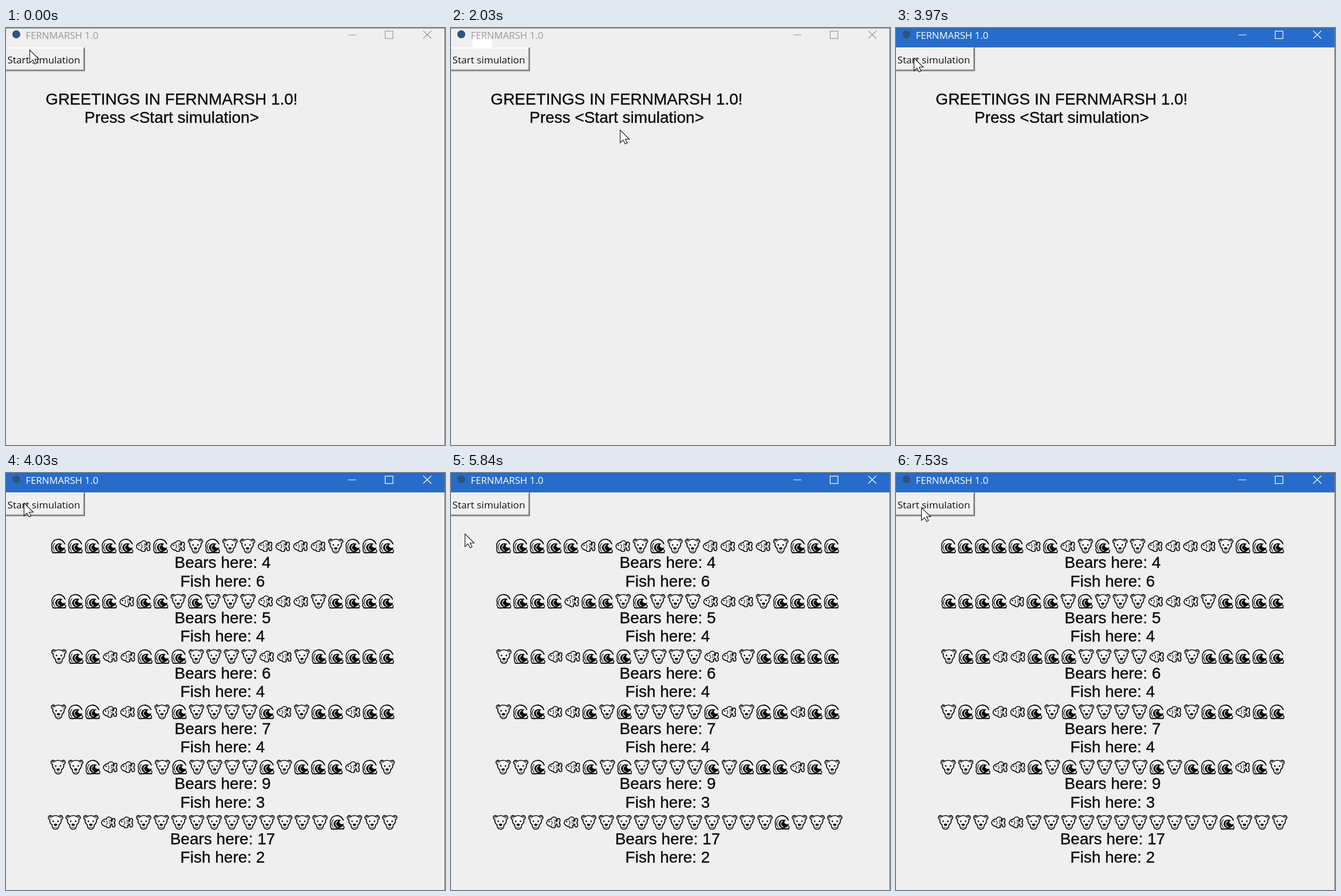
Write an HTML page with a canvas that moves like this. It is 767 px wide and 730 px high and loops after 8 s.

```html
<!DOCTYPE html>
<html lang="en">
<head>
<meta charset="utf-8">
<title>FERNMARSH 1.0</title>
<style>
html, body { margin: 0; width: 767px; height: 730px; overflow: hidden; background: #efefef; }
canvas { display: block; }
</style>
</head>
<body>
<canvas id="stage" width="767" height="730"></canvas>
<script>
const ctx = document.getElementById('stage').getContext('2d');
const LOOP = 8000, STEP = 60;
const PATCH = 430, ACTIVE = 3810, PRESS = 3870, RELEASE = 3950, RESULT = 4030;
const BG = '#efefef', INK = '#0a0a0a', PALE = '#f7f7f7';
const UI = '"Open Sans", "Noto Sans", sans-serif';
const BODY = '28px "Liberation Sans", Arial, sans-serif';
const LINE = 32.25, FIRST = 134;

// W water, F fish, B bear
const rivers = [
  'WWWWWFWFBWBBFFFFBWWW',
  'WWWWFWWBWBBBFFFBWWWW',
  'BWWFFWWWBBBBFFBWWWWW',
  'BWWFFWBWBBBBWFBWWFWW',
  'BBWFFWBWBBBBWBWWWFWB',
  'BBBFFBBBBBBBBBBBWBBB'
];

// Each pointer move is one quadratic curve that begins where the last one ended
const home = [41, 38];
const moves = [
  { from: 90, to: 710, bend: [67, -23], end: [45, 57] },
  { from: 1210, to: 1970, bend: [366, 105], end: [306, 203] },
  { from: 2030, to: 2660, bend: [247, 47], end: [31, 41] },
  { from: 2900, to: 3140, bend: [31, 46], end: [31, 52] },
  { from: 4580, to: 4660, bend: [31, 50], end: [31, 54] },
  { from: 5570, to: 6070, bend: [21, 94], end: [24, 158] },
  { from: 6510, to: 6990, bend: [24, 100], end: [44, 50] },
  { from: 7350, to: 7530, bend: [44, 55], end: [44, 60] }
];

function pointerAt(t) {
  let pos = home;
  for (const { from, to, bend, end } of moves) {
    if (t < from) break;
    const gaps = Math.round((to - from) / STEP);
    const done = Math.floor((t - from) / (to - from) * gaps + 1e-6) + 1;
    const u = Math.min(1, done / (gaps + 1)), v = 1 - u;
    pos = pos.map((p, i) => Math.round(v * v * p + 2 * u * v * bend[i] + u * u * end[i]));
  }
  return pos;
}

function rect(color, x, y, w, h) {
  ctx.fillStyle = color;
  ctx.fillRect(x, y, w, h);
}

function text(str, x, y, font, color) {
  ctx.font = font;
  ctx.fillStyle = color;
  ctx.fillText(str, x, y);
}

// Body copy is centred and a little heavier than the plain face
function bodyLine(str, x, row) {
  const y = FIRST + row * LINE;
  ctx.textAlign = 'center';
  text(str, x, y, BODY, INK);
  ctx.strokeStyle = INK;
  ctx.lineWidth = .35;
  ctx.strokeText(str, x, y);
  ctx.textAlign = 'left';
}

function oval(color, x, y, rx, ry = rx) {
  ctx.fillStyle = color;
  ctx.beginPath();
  ctx.ellipse(x, y, rx, ry, 0, 0, Math.PI * 2);
  ctx.fill();
}

function arc(color, width, x, y, r, a, b) {
  ctx.strokeStyle = color;
  ctx.lineWidth = width;
  ctx.beginPath();
  ctx.arc(x, y, r, a * Math.PI, b * Math.PI);
  ctx.stroke();
}

function lines(color, width, ...runs) {
  ctx.strokeStyle = color;
  ctx.lineWidth = width;
  ctx.beginPath();
  for (const [x1, y1, x2, y2] of runs) {
    ctx.moveTo(x1, y1);
    ctx.lineTo(x2, y2);
  }
  ctx.stroke();
}

// Ovals merged into one outlined silhouette
function blob(...ovals) {
  for (const [color, grow] of [[INK, .8], [PALE, -.8]])
    for (const [x, y, rx, ry = rx] of ovals) oval(color, x, y, rx + grow, ry + grow);
}

const glyphs = {
  B() {
    blob([-9, -8.5, 3.6], [9, -8.5, 3.6], [0, -3, 10, 9], [0, 5.5, 6, 6.5]);
    for (const side of [-1, 1]) {
      arc(INK, 1.1, side * 9, -8.5, 1.5, .8, 2.2);
      oval(INK, side * 4.2, -2, 1.4);
      arc(INK, 1, side * 1.6, 7.6, 1.6, .1, .9);
    }
    oval(INK, 0, 4, 2.9, 2);
  },
  F() {
    blob([1, -6, 4.5, 3.5], [0, 7, 3.5, 2.5], [9, -3.5, 2.6, 3.4], [9, 4.5, 2.6, 3.4], [6.5, .5, 4, 3], [-3, .5, 9, 6.6]);
    oval(INK, -7.5, -1.5, 1.3);
    arc(INK, 1.1, -6, .5, 4, -.35, .35);
    for (let i = 0; i < 4; i++) arc(INK, 1, 1 + i % 2 * 3, -3 + i * 2, 1.4, -.5, .5);
  },
  W() {
    blob([-.5, -.5, 11.6, 11.4], [-6, 6, 6], [7, 8.5, 5, 3]);
    oval(INK, 2, 2.5, 8.5, 7.5);
    oval(BG, 8.5, -.5, 4.8, 3.6);
    arc(INK, 1.6, -.5, -.5, 11.6, -.5, -.08);
    arc(PALE, 1.3, 3, 2.5, 5.5, .55, 1.4);
    arc(INK, 1.1, 1, 2, 10.5, .75, 1.25);
    rect(INK, 1, 4, 8, 1.6);
    rect(INK, -11, 10.5, 23, 1.8);
  }
};

function river(row, y) {
  const width = c => c === 'W' ? 29.5 : 30.8;
  let x = 378.5 - [...row].reduce((sum, c) => sum + width(c), 0) / 2;
  for (const c of row) {
    ctx.save();
    ctx.translate(x + width(c) / 2, y);
    glyphs[c]();
    ctx.restore();
    x += width(c);
  }
}

function results() {
  rivers.forEach((row, i) => {
    const count = c => row.split(c).length - 1;
    river(row, 128 + i * 3 * LINE);
    bodyLine('Bears here: ' + count('B'), 378.5, i * 3 + 1);
    bodyLine('Fish here: ' + count('F'), 378.5, i * 3 + 2);
  });
}

function greeting() {
  bodyLine('GREETINGS IN FERNMARSH 1.0!', 289.5, 0);
  bodyLine('Press <Start simulation>', 289.5, 1);
}

function titleBar(t) {
  const active = t >= ACTIVE;
  const color = active ? '#ffffff' : '#999999';
  if (active) rect('#286ccb', 0, 0, 766, 34);
  else if (t >= PATCH) rect('#ffffff', 38, 12, 34, 22);
  rect(active ? '#3f5f92' : '#858585', 0, 0, 767, 1);
  oval('#2f5480', 18, 11, 7);
  text('FERNMARSH 1.0', 34.5, 19, '16.8px ' + UI, color);
  lines(color, 1.2, [598, 12, 612, 12], [729, 5, 743, 18.5], [743, 5, 729, 18.5]);
  ctx.strokeRect(662.5, 5.5, 13.5, 13);
}

function button(pressed) {
  const [light, shade, dark] = pressed ? ['#808080', '#f0f0f0', '#ffffff'] : ['#fcfcfc', '#a0a0a0', '#707070'];
  const shift = pressed ? 1 : 0;
  rect(dark, 0, 34, 138, 41.5);
  rect(shade, 0, 34, 136.5, 40);
  rect('#f0f0f0', 0, 34, 135, 38.5);
  rect(light, 0, 34, 136, 2);
  text('Start simulation', 2.5 + shift, 62 + shift, '17.2px ' + UI, '#111111');
}

const arrow = new Path2D('M0 0V22.5L5.2 17.6L9 24.5L12.3 22.8L9 16H16Z');
function pointer([x, y]) {
  ctx.save();
  ctx.translate(x + .5, y + .5);
  ctx.fillStyle = '#ffffff';
  ctx.fill(arrow);
  ctx.strokeStyle = '#111111';
  ctx.lineWidth = 1.1;
  ctx.stroke(arrow);
  ctx.restore();
}

function draw(t) {
  rect(BG, 0, 0, 767, 730);
  titleBar(t);
  button(t >= PRESS && t < RELEASE);
  if (t >= RESULT) results();
  else greeting();
  rect('#777777', 766, 0, 1, 730);
  pointer(pointerAt(t));
}

let start;
function tick(now) {
  start ??= now;
  draw((now - start) % LOOP);
  requestAnimationFrame(tick);
}
draw(0);
requestAnimationFrame(tick);
</script>
</body>
</html>
```
